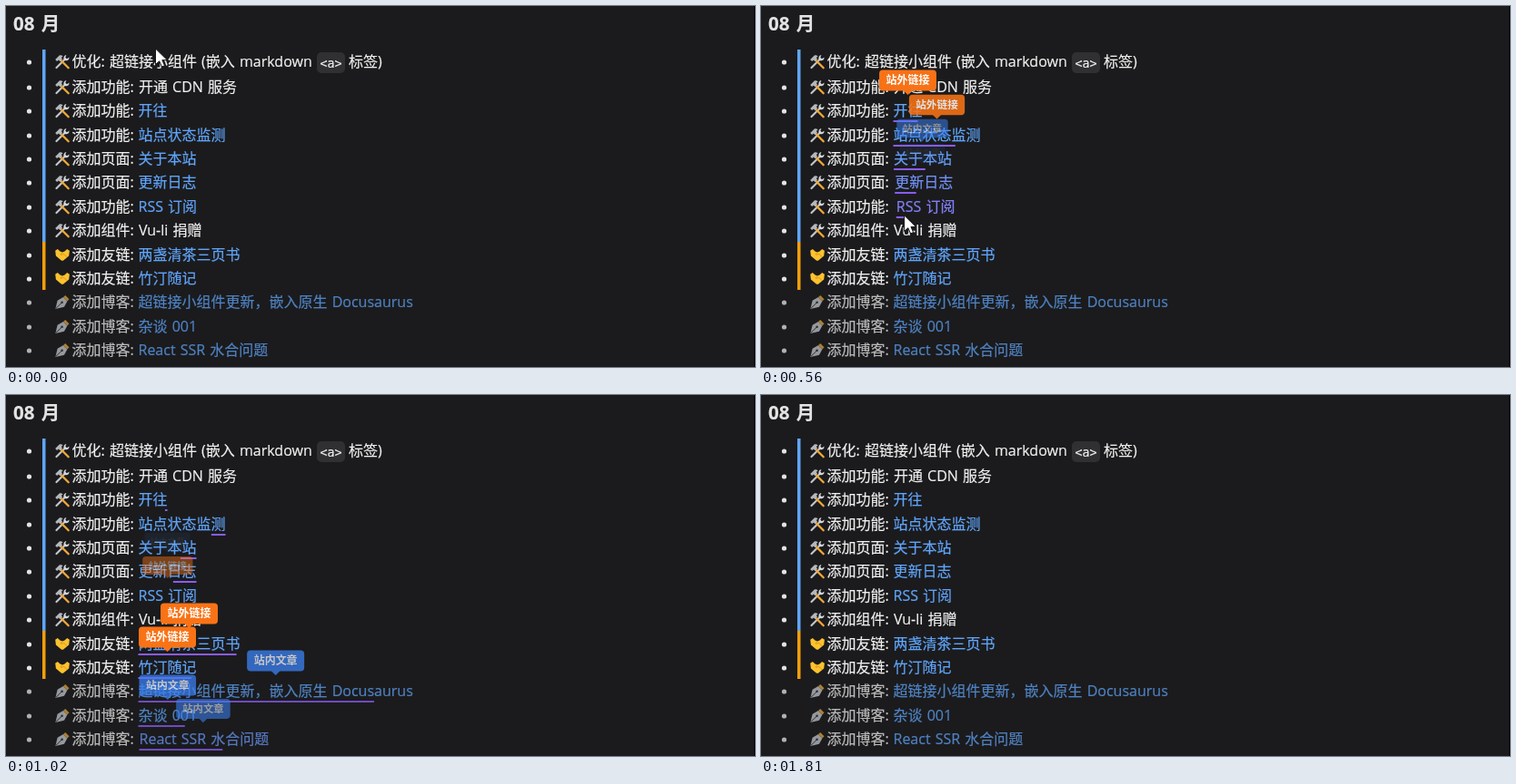
An HTML page for the animation above (2050 ms loop, 824 by 398 pixels).

```html
<!DOCTYPE html>
<html lang="zh-CN">
<head>
<meta charset="utf-8">
<title>08 月</title>
<style>
  html, body { margin: 0; width: 100%; height: 100%; overflow: hidden; background: #1b1b1d; }
  svg { display: block; }
  text {
    font: 16px "Open Sans", "Noto Sans CJK SC", "Noto Sans CJK", sans-serif;
    word-spacing: 1px; white-space: pre; color: #f0f0f0;
    fill: currentColor; stroke: currentColor; stroke-width: .2px;
  }
  .title { font-size: 20.5px; font-weight: 700; word-spacing: 2px; color: #e3e3e3; }
  .code { font: 13.3px "DejaVu Sans Mono", monospace; }
  .tip { font-size: 12px; font-weight: 700; color: #fff; stroke: none; text-anchor: middle; }
</style>
</head>
<body>
<svg id="stage" width="824" height="398" viewBox="0 0 824 398">
  <defs>
    <symbol id="tools" viewBox="0 0 16 16" overflow="visible">
      <path d="M1.500 14.500L11 5" stroke="#c3c7cc" stroke-width="2.200" stroke-linecap="round"/>
      <path d="M12.400 .4Q9 1.200 9.400 5Q10.500 7.500 13.500 6.600Q15.800 5.500 15.600 3L13 4.800L11.300 3.300Z" fill="#d3d6da"/>
      <path d="M6.200 6.200L14.700 14.700" stroke="#f3a935" stroke-width="2.300" stroke-linecap="round"/>
      <path d="M.2 5.600L5 .8Q7 .4 8.600 1.700L6.900 3.500L8 5L5.300 7.600L3.900 6.100L2.100 7.500Z" fill="#b4b8be"/>
    </symbol>
    <symbol id="hands" viewBox="0 0 16 16" overflow="visible">
      <path d="M.2 3.200L2.800 1.400L5.500 4L8 5L10.500 4L13.200 1.400L15.900 3.200L15.200 9L9.500 13.700Q8 14.700 6.500 13.700L.9 9Z" fill="#fcc22f"/>
      <path d="M8 5L6 7.500Q7.500 8.500 9.300 6.700L13 10" fill="none" stroke="#d98a16" stroke-width=".8"/>
    </symbol>
    <symbol id="pen" viewBox="0 0 16 16" overflow="visible">
      <path d="M.4 15.400L2.600 6.200L9 2.600L13.400 7L10 13.200Z" fill="#c0c3c8"/>
      <path d="M9 2.600L11.300 .5L15.500 4.700L13.400 7Z" fill="#e0a13a"/>
      <path d="M.8 15L7.300 8.600" stroke="#33363b" stroke-width="1"/>
      <circle cx="7.600" cy="8.300" r="1.300" fill="#33363b"/>
    </symbol>
  </defs>
  <rect x="823" width="1" height="398"/>
  <text class="title" x="8" y="27">08 月</text>
  <rect x="40" y="48" width="3.500" height="212" fill="#60a5fa"/>
  <rect x="40" y="260" width="3.500" height="53" fill="#f59e0b"/>
  <g id="rows"></g>
  <g id="tips"></g>
  <g id="cursor" stroke="#16161a" stroke-linejoin="round" fill="#fff">
    <path id="arrow" d="M0 0V17.500L4.200 13.800L7 20L10 18.700L7.300 12.600H12.800Z"/>
    <path id="hand" d="M-1.700 1Q-1.700 -.8 0 -.8Q1.700 -.8 1.700 1V7Q4.300 5.800 4.700 7.700Q7 6.800 7.400 8.900Q9.700 8.500 9.700 10.800V15Q9.600 18 7.800 20V22.500H-1.700V20.500Q-4 18 -5.700 14.300Q-7 11.500 -5.400 10.800Q-4 10.500 -1.700 13.500Z"/>
  </g>
</svg>
<script>
const LOOP = 2050, STEP = 46.3, LAST_STEP = 39;
const HOLD = 405, DRAW = 500, DIM = 0.75;
const LINK_X = 145.5;

// enter: when the pointer reaches the row; leave: when its nudge starts to relax
const rows = [
  { icon: "tools", label: "优化: 超链接小组件 (嵌入 markdown", code: true, enter: 70, leave: 190 },
  { icon: "tools", label: "添加功能: 开通 CDN 服务", enter: 180, leave: 235 },
  { icon: "tools", label: "添加功能:", link: "开往", out: true, enter: 285 },
  { icon: "tools", label: "添加功能:", link: "站点状态监测", out: true, enter: 345 },
  { icon: "tools", label: "添加页面:", link: "关于本站", enter: 398 },
  { icon: "tools", label: "添加页面:", link: "更新日志", enter: 440 },
  { icon: "tools", label: "添加功能:", link: "RSS 订阅", out: true, enter: 495 },
  { icon: "tools", label: "添加组件: Vu-li 捐赠", enter: 572 },
  { icon: "hands", label: "添加友链:", link: "两盏清茶三页书", out: true, enter: 638 },
  { icon: "hands", label: "添加友链:", link: "竹汀随记", out: true, enter: 695 },
  { icon: "pen", label: "添加博客:", link: "超链接小组件更新，嵌入原生 Docusaurus", dim: true, enter: 737 },
  { icon: "pen", label: "添加博客:", link: "杂谈 001", dim: true, enter: 773 },
  { icon: "pen", label: "添加博客:", link: "React SSR 水合问题", dim: true, enter: 832, leave: 940 }
];

// time, x, y
const path = [
  [0, 164.5, 47], [140, 164, 72], [280, 163.5, 113], [420, 161, 165],
  [560, 157.5, 233], [700, 167, 293], [840, 193, 372], [900, 205, 402]
];

const byId = id => document.getElementById(id);
const clamp = v => Math.min(1, Math.max(0, v));
const ramp = (t, from, length) => clamp((t - from) / length);
const mix = (a, b, p) => a + (b - a) * p;

// CSS "ease" curve
function ease(p) {
  let lo = 0, hi = 1;
  for (let i = 0; i < 20; i++) {
    const s = (lo + hi) / 2;
    if (0.75 * s * (1 - s) + s ** 3 < p) lo = s; else hi = s;
  }
  const s = (lo + hi) / 2;
  return 0.3 * s * (1 - s) ** 2 + 3 * s * s * (1 - s) + s ** 3;
}

function add(parent, tag, attrs, text) {
  const node = document.createElementNS("http://www.w3.org/2000/svg", tag);
  for (const key in attrs) node.setAttribute(key, attrs[key]);
  if (text) node.textContent = text;
  parent.appendChild(node);
  return node;
}

function buildTip(row) {
  const color = row.out ? "#f97316" : "#3b82f6";
  row.tip = add(byId("tips"), "g", {});
  add(row.tip, "path", { d: "M-5 11H5L0 16Z", fill: color });
  add(row.tip, "rect", { x: -31.5, y: -11.5, width: 63, height: 23, rx: 4, fill: color });
  add(row.tip, "text", { class: "tip", y: 4.4 }, row.out ? "站外链接" : "站内文章");
}

function buildRow(row, i) {
  row.y = i ? Math.round(62.4 + 26.4 * i) : 61;
  const base = row.y + 6;
  const group = add(byId("rows"), "g", { opacity: row.dim ? DIM : 1 });
  add(group, "circle", { cx: 25.5, cy: row.y + 1, r: 2.6, fill: "#e3e3e3" });
  const body = add(group, "g", {});
  add(body, "use", { href: "#" + row.icon, x: 54, y: row.y - 7.5, width: 16, height: 16 });
  add(body, "text", { x: 72.5, y: base }, row.label);
  row.mover = body;
  if (row.code) {
    add(body, "rect", { x: 342, y: 51, width: 31, height: 23, rx: 5, fill: "#303033" });
    add(body, "text", { class: "code", x: 345.5, y: 67.5 }, "<a>");
    add(body, "text", { x: 377, y: base }, "标签)");
  }
  if (row.link) {
    row.mover = add(group, "g", {});
    row.text = add(row.mover, "text", { x: LINK_X, y: base }, row.link);
    row.line = add(row.mover, "rect", { y: row.y + 11, height: 2, fill: "#8b5cf6" });
    row.width = row.text.getComputedTextLength();
    buildTip(row);
  }
}

function drawRow(row, t) {
  const leave = row.leave || row.enter + 60;
  const nudge = ease(ramp(t, row.enter - 15, 60)) * (1 - ramp(t, leave, 115));
  row.mover.setAttribute("transform", `translate(${3.3 * nudge} 0)`);
  if (!row.link) return;

  row.text.style.color = `rgb(${mix(96, 132, nudge)},${mix(165, 128, nudge)},${mix(250, 246, nudge)})`;

  const from = ease(ramp(t, row.enter + HOLD, DRAW));
  const to = ease(ramp(t, row.enter, DRAW));
  row.line.setAttribute("x", LINK_X + row.width * from);
  row.line.setAttribute("width", Math.max(0, row.width * (to - from)));

  const shown = ease(ramp(t, row.enter + 100, 190)) * (1 - ramp(t, row.enter + 440, 150));
  const x = LINK_X + row.width / 2;
  row.tip.setAttribute("transform", `translate(${x} ${row.y - 33}) scale(${0.78 + 0.22 * shown})`);
  row.tip.setAttribute("opacity", shown * (row.dim ? DIM : 1));
}

function drawCursor(t) {
  const next = path.findIndex(point => point[0] > t);
  byId("cursor").style.display = next < 0 ? "none" : "";
  if (next < 0) return;
  const a = path[next - 1], b = path[next];
  const p = (t - a[0]) / (b[0] - a[0]);
  byId("cursor").setAttribute("transform", `translate(${mix(a[1], b[1], p)} ${mix(a[2], b[2], p)})`);
  const pointing = t > 260 && (t < 545 || t > 620);
  byId("hand").style.display = pointing ? "" : "none";
  byId("arrow").style.display = pointing ? "none" : "";
}

function render(time) {
  const t = Math.min(LAST_STEP, Math.floor((time % LOOP) / STEP)) * STEP;
  rows.forEach(row => drawRow(row, t));
  drawCursor(t);
}

rows.forEach(buildRow);
const start = performance.now();
function tick() {
  render(performance.now() - start);
  requestAnimationFrame(tick);
}
tick();
</script>
</body>
</html>
```
